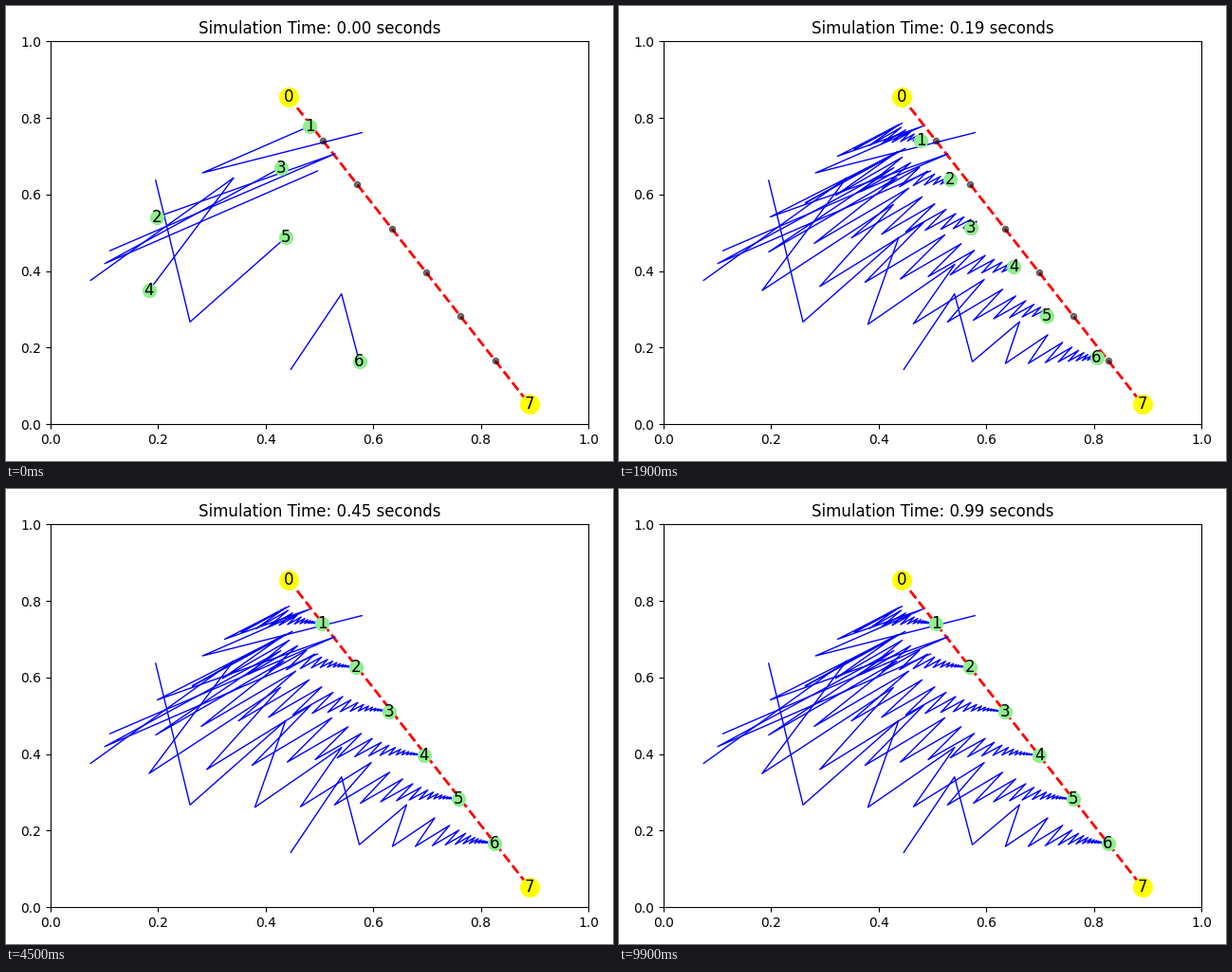
Recreate the animation shown at these times as a matplotlib script. Size 640 by 480 pixels, loop 10000 ms.

```python
import numpy as np
import matplotlib.pyplot as plt
from matplotlib.animation import FuncAnimation

FRAMES = 100
DT = 0.01
START = np.array([
    (0.4427, 0.8555), (0.5790, 0.7617), (0.1110, 0.4535), (0.4965, 0.6615),
    (0.0750, 0.3760), (0.1958, 0.6370), (0.4470, 0.1435), (0.8905, 0.0523),
])
LAST = len(START) - 1


def simulate(steps):
    """Explicit diffusion along the chain with both ends held fixed."""
    rate = DT * LAST ** 2
    path = [START]
    for _ in range(steps):
        p = path[-1].copy()
        p[1:-1] += rate * (p[:-2] - 2 * p[1:-1] + p[2:])
        path.append(p)
    return np.array(path)


path = simulate(FRAMES + 1)
ends = START[[0, LAST]]
goals = np.linspace(ends[0], ends[1], LAST + 1)[1:-1]

plt.rcParams["font.family"] = "DejaVu Sans"
fig, ax = plt.subplots(figsize=(6.4, 4.8), dpi=100)
ax.set_xlim(0, 1)
ax.set_ylim(0, 1)
title = ax.set_title("Simulation Time: 0.00 seconds")
fig.tight_layout()

ax.plot(*ends.T, "r--", lw=2, zorder=1.5)
ax.scatter(*goals.T, s=20, c="black", alpha=0.5, zorder=2.5)
trails = [ax.plot([], [], color="blue", lw=1, zorder=2)[0]
          for _ in range(1, LAST)]
ax.scatter(*ends.T, s=200, c="yellow", zorder=3)
nodes = ax.scatter(*START[1:-1].T, s=100, c="lightgreen", zorder=3)
labels = [ax.text(x, y, str(i), fontsize=12, ha="center", va="center", zorder=4)
          for i, (x, y) in enumerate(START)]


def update(frame):
    step = frame + 2
    now = path[step]
    nodes.set_offsets(now[1:-1])
    for i, trail in enumerate(trails, 1):
        trail.set_data(path[:step + 1, i, 0], path[:step + 1, i, 1])
    for label, pos in zip(labels, now):
        label.set_position(pos)
    title.set_text(f"Simulation Time: {frame * DT:.2f} seconds")
    return [nodes, title, *trails, *labels]


anim = FuncAnimation(fig, update, frames=FRAMES, interval=100,
                     repeat=True, repeat_delay=0, blit=False)
plt.show()
```
